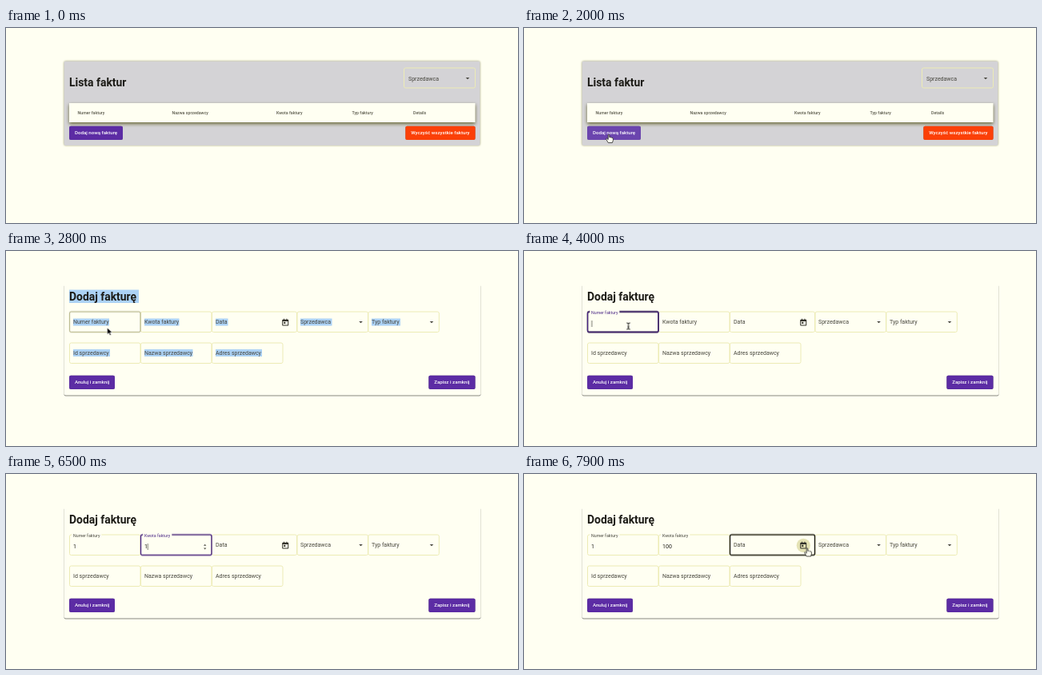
An HTML page that plays this animation: 640 px wide and 244 px high, repeating every 8 s.

```html
<!DOCTYPE html>
<html lang="pl">
<head>
<meta charset="utf-8">
<title>Lista faktur</title>
<style>
  :root { --bg: #fffff2; --ink: #1c1b16; --purple: #5c2ca4; }
  html, body { margin: 0; width: 100%; height: 100%; overflow: hidden; background: var(--bg); }
  svg { display: block; width: 640px; height: 244px; }
  text { font: 400 7px Roboto, sans-serif; fill: #45443c; white-space: pre; }
  .title { font-size: 13.9px; font-weight: 700; fill: var(--ink); }
  .head text { font-size: 5.25px; font-weight: 500; fill: #5a594c; }
  .btn text { font-size: 6.13px; font-weight: 500; fill: #fff; }
  .btn rect { fill: var(--purple); filter: drop-shadow(0 .8px .7px #0006); }
  .btn .red { fill: #fb4008; }
  .val { fill: var(--ink); }
  .box { fill: none; stroke: #ecebb5; }
  .ring { fill: none; stroke: var(--ink); stroke-width: 1.4; }
  .focus { stroke: #492585; }
  .gap { fill: var(--bg); }
  .mark { fill: #acd2f5; }
  .arrow { fill: #45443c; }

  /* One 8 s loop: 1% = 80 ms */
  .step, .tw { animation: 8s infinite both; }
  .step { animation-timing-function: step-end; }
  .tw { animation-timing-function: linear; }

  .list { animation-name: list; }
  @keyframes list { 0% { visibility: visible } 26.2%, 100% { visibility: hidden } }
  .form { animation-name: form; }
  @keyframes form { 0% { visibility: hidden } 26.2%, 100% { visibility: visible } }
  .sel { animation-name: sel; }
  @keyframes sel { 0% { opacity: 0 } 27.5% { opacity: 1 } 36.2%, 100% { opacity: 0 } }
  .addHover { animation-name: addHover; }
  @keyframes addHover { 0%, 13% { fill: #5c2ca4 } 16%, 100% { fill: #6b45ae } }

  .hov1 { animation-name: hov1; }
  @keyframes hov1 { 0%, 34% { opacity: 0 } 35% { opacity: .22 } 38.5%, 55% { opacity: 1 } 56.5%, 100% { opacity: 0 } }
  .foc1 { animation-name: foc1; }
  @keyframes foc1 { 0%, 36.2% { opacity: 0 } 38%, 65% { opacity: 1 } 66.5%, 100% { opacity: 0 } }
  .hov2 { animation-name: hov2; }
  @keyframes hov2 { 0%, 55.5% { opacity: 0 } 60%, 65% { opacity: 1 } 67%, 100% { opacity: 0 } }
  .foc2 { animation-name: foc2; }
  @keyframes foc2 { 0%, 65% { opacity: 0 } 66.5%, 96.2% { opacity: 1 } 98%, 100% { opacity: 0 } }
  .hov3 { animation-name: hov3; }
  @keyframes hov3 { 0%, 93% { opacity: 0 } 96.5%, 100% { opacity: 1 } }

  .lab1 { animation-name: lab1; }
  @keyframes lab1 {
    0%, 36.2% { transform: none; fill: #45443c; animation-timing-function: ease-out }
    38.2%, 65% { transform: translate(0, -12.3px) scale(.75); fill: #492585 }
    66.5%, 100% { transform: translate(0, -12.3px) scale(.75); fill: #45443c }
  }
  .lab2 { animation-name: lab2; }
  @keyframes lab2 {
    0%, 65% { transform: none; fill: #45443c; animation-timing-function: ease-out }
    67%, 96.2% { transform: translate(0, -12.3px) scale(.75); fill: #492585 }
    98%, 100% { transform: translate(0, -12.3px) scale(.75); fill: #45443c }
  }
  .gap1 { animation-name: gap1; }
  @keyframes gap1 { 0% { opacity: 0 } 37%, 100% { opacity: 1 } }
  .gap2 { animation-name: gap2; }
  @keyframes gap2 { 0% { opacity: 0 } 66%, 100% { opacity: 1 } }

  .num { animation-name: num; }
  @keyframes num { 0% { fill-opacity: 0 } 53.1%, 100% { fill-opacity: 1 } }
  .d1 { animation-name: d1; }
  @keyframes d1 { 0% { fill-opacity: 0 } 78.7%, 100% { fill-opacity: 1 } }
  .d2 { animation-name: d2; }
  @keyframes d2 { 0% { fill-opacity: 0 } 82.5%, 100% { fill-opacity: 1 } }
  .d3 { animation-name: d3; }
  @keyframes d3 { 0% { fill-opacity: 0 } 85%, 100% { fill-opacity: 1 } }

  /* Blinks every 500 ms, restarted by focus and typing */
  .caret { animation-name: caret; }
  @keyframes caret {
    0% { opacity: 0; transform: translate(84.8px, 91px) }
    36.2% { opacity: 1; transform: translate(84.8px, 91px) }
    42.5% { opacity: 0; transform: translate(84.8px, 91px) }
    48.7% { opacity: 1; transform: translate(84.8px, 91px) }
    53.1% { opacity: 1; transform: translate(88.6px, 91px) }
    59.4% { opacity: 0; transform: translate(88.6px, 91px) }
    65% { opacity: 1; transform: translate(173.6px, 91px) }
    71.2% { opacity: 0; transform: translate(173.6px, 91px) }
    77.5% { opacity: 1; transform: translate(173.6px, 91px) }
    78.7% { opacity: 1; transform: translate(177.3px, 91px) }
    82.5% { opacity: 1; transform: translate(181.2px, 91px) }
    85% { opacity: 1; transform: translate(185.2px, 91px) }
    91.2%, 100% { opacity: 0; transform: translate(185.2px, 91px) }
  }
  .spin { animation-name: spin; }
  @keyframes spin { 0% { opacity: 0 } 56% { opacity: 1 } 96.2%, 100% { opacity: 0 } }
  .halo { animation-name: halo; }
  @keyframes halo { 0%, 95% { opacity: 0 } 97%, 100% { opacity: 1 } }

  .mouse { animation: move 8s ease-in-out infinite both; }
  @keyframes move {
    0%, 12.5% { transform: translate(118px, 143px) }
    15%, 27.5% { transform: translate(106px, 133px) }
    35% { transform: translate(126.5px, 96px) }
    37.5%, 53.7% { transform: translate(130.5px, 94px) }
    59.5%, 91.2% { transform: translate(214.5px, 92px) }
    96.5%, 100% { transform: translate(354px, 92.5px) }
  }
  .point { animation-name: point; }
  @keyframes point { 0% { opacity: 0 } 12.5% { opacity: 1 } 13.5% { opacity: 0 } 26.2% { opacity: 1 } 36.2%, 100% { opacity: 0 } }
  .hand { animation-name: hand; }
  @keyframes hand { 0% { opacity: 0 } 13.5% { opacity: 1 } 26.2% { opacity: 0 } 95%, 100% { opacity: 1 } }
  .beam { animation-name: beam; }
  @keyframes beam { 0% { opacity: 0 } 36.2% { opacity: 1 } 53.1% { opacity: 0 } 54.5% { opacity: 1 } 78.7% { opacity: 0 } 91.2% { opacity: 1 } 95%, 100% { opacity: 0 } }
</style>
</head>
<body>
<svg viewBox="0 0 640 244">
  <defs>
    <path id="drop" d="M-2.3-1.1h4.6L0 1.2z"/>
    <rect id="field" x=".5" y=".5" width="88.5" height="25.5" rx="2"/>
    <rect id="wide" x=".5" y=".5" width="106" height="25.5" rx="2"/>
  </defs>

  <g class="list step">
    <rect x="72.5" y="41.5" width="520" height="105.5" rx="2" fill="#d4d3d6" style="filter:drop-shadow(0 .8px .8px #5508)"/>
    <text class="title" x="79" y="72.5">Lista faktur</text>
    <rect class="box" x="497.5" y="50" width="89" height="25" rx="2"/>
    <text x="503" y="65.5">Sprzedawca</text>
    <use href="#drop" class="arrow" x="577" y="63"/>
    <g class="head">
      <rect x="79" y="94" width="507.5" height="24" fill="#fffff2" style="filter:drop-shadow(0 2px 2.2px #440b)"/>
      <text x="89.5" y="107.8">Numer faktury</text>
      <text x="207.5" y="107.8">Nazwa sprzedawcy</text>
      <text x="338" y="107.8">Kwota faktury</text>
      <text x="432.5" y="107.8">Typ faktury</text>
      <text x="509" y="107.8">Details</text>
    </g>
    <g class="btn">
      <rect class="addHover tw" x="79" y="122.7" width="67" height="17.3" rx="2"/>
      <text x="86" y="133.4">Dodaj nową fakturę</text>
      <rect class="red" x="499.3" y="122.7" width="87.3" height="17.3" rx="2"/>
      <text x="506.2" y="133.4">Wyczyść wszystkie faktury</text>
    </g>
  </g>

  <g class="form step">
    <rect x="72.5" y="41.5" width="521" height="139" rx="2" fill="#fffff2" style="filter:drop-shadow(0 1px .5px #0007)"/>
    <g class="mark sel step">
      <rect x="79" y="48.5" width="87" height="16.5"/>
      <rect x="84" y="84.5" width="45" height="9"/>
      <rect x="173" y="84.5" width="43.5" height="9"/>
      <rect x="262" y="84.5" width="15.5" height="9"/>
      <rect x="368" y="84.5" width="39.5" height="9"/>
      <rect x="457" y="84.5" width="36" height="9"/>
      <rect x="84" y="123" width="46" height="9"/>
      <rect x="173" y="123" width="60.5" height="9"/>
      <rect x="262" y="123" width="58" height="9"/>
    </g>
    <text class="title" x="79" y="61.7">Dodaj fakturę</text>

    <g class="box">
      <use href="#field" x="79" y="75.5"/>
      <use href="#field" x="168" y="75.5"/>
      <use href="#wide" x="257" y="75.5"/>
      <use href="#field" x="363.5" y="75.5"/>
      <use href="#field" x="452.3" y="75.5"/>
      <use href="#field" x="79" y="114.5"/>
      <use href="#field" x="168" y="114.5"/>
      <use href="#field" x="257" y="114.5"/>
    </g>
    <use href="#field" class="ring hov1 tw" x="79" y="75.5"/>
    <use href="#field" class="ring focus foc1 tw" x="79" y="75.5"/>
    <use href="#field" class="ring hov2 tw" x="168" y="75.5"/>
    <use href="#field" class="ring focus foc2 tw" x="168" y="75.5"/>
    <use href="#wide" class="ring hov3 tw" x="257" y="75.5"/>
    <rect class="gap gap1 step" x="82.3" y="74" width="37" height="4.5"/>
    <rect class="gap gap2 step" x="171.3" y="74" width="36" height="4.5"/>

    <g transform="translate(84 91.4)"><text class="lab1 tw">Numer faktury</text></g>
    <g transform="translate(173 91.4)"><text class="lab2 tw">Kwota faktury</text></g>
    <text x="262" y="91.4">Data</text>
    <text x="368" y="91.4">Sprzedawca</text>
    <text x="457" y="91.4">Typ faktury</text>
    <text x="84" y="130">Id sprzedawcy</text>
    <text x="173" y="130">Nazwa sprzedawcy</text>
    <text x="262" y="130">Adres sprzedawcy</text>
    <use href="#drop" class="arrow" x="443.5" y="89"/>
    <use href="#drop" class="arrow" x="532" y="89"/>

    <circle class="halo tw" cx="349.3" cy="89.3" r="8.6" fill="#e4e2b4"/>
    <g transform="translate(349.2 89.3)" fill="#33322b">
      <path fill-rule="evenodd" d="M-3.2-3.6h1v-1h1v1h2.4v-1h1v1h1q.8 0 .8.8v6.2q0 .8-.8.8h-6.4q-.8 0-.8-.8v-6.2q0-.8.8-.8zM-3-1.4v4.6h6v-4.6z"/>
      <path d="M-2-.5h2.1v2.1H-2z"/>
    </g>
    <path class="spin step" d="M247 89.7l1.7-2 1.7 2zM247 92.4l1.7 2 1.7-2z" fill="#55544a"/>

    <text class="val num step" x="84" y="93.2">1</text>
    <text class="val" x="173" y="93.2"><tspan class="d1 step">1</tspan><tspan class="d2 step">0</tspan><tspan class="d3 step">0</tspan></text>
    <rect class="caret step" x="-.3" y="-4" width=".6" height="8" fill="#1c1b16"/>

    <g class="btn">
      <rect x="79" y="155.7" width="57" height="17.3" rx="2"/>
      <text x="86" y="166.4">Anuluj i zamknij</text>
      <rect x="528.3" y="155.7" width="58.3" height="17.3" rx="2"/>
      <text x="535.2" y="166.4">Zapisz i zamknij</text>
    </g>
  </g>

  <g class="mouse">
    <path class="point step" d="M0 0v8.4l2-1.8 1.3 3 1.5-.7-1.3-2.8h2.7z" fill="#000" stroke="#fff" stroke-width=".6"/>
    <path class="hand step" d="M-.8.8Q0-.4.8.8v3l1.2-.2.5.5 1.2-.1.5.6q1.2-.2 1.2.8v2.2l-1 3H-.7L-3.2 6.4q-.5-1.2.6-1.3L-.8 6.6z" fill="#fffff2" stroke="#222" stroke-width=".8" stroke-linejoin="round"/>
    <path class="beam step" d="M-2.2-4Q0-4 0-3 0-4 2.2-4M0-3v6M-2.2 4Q0 4 0 3 0 4 2.2 4M-1 1.2h2" fill="none" stroke="#111"/>
  </g>
</svg>
</body>
</html>
```
